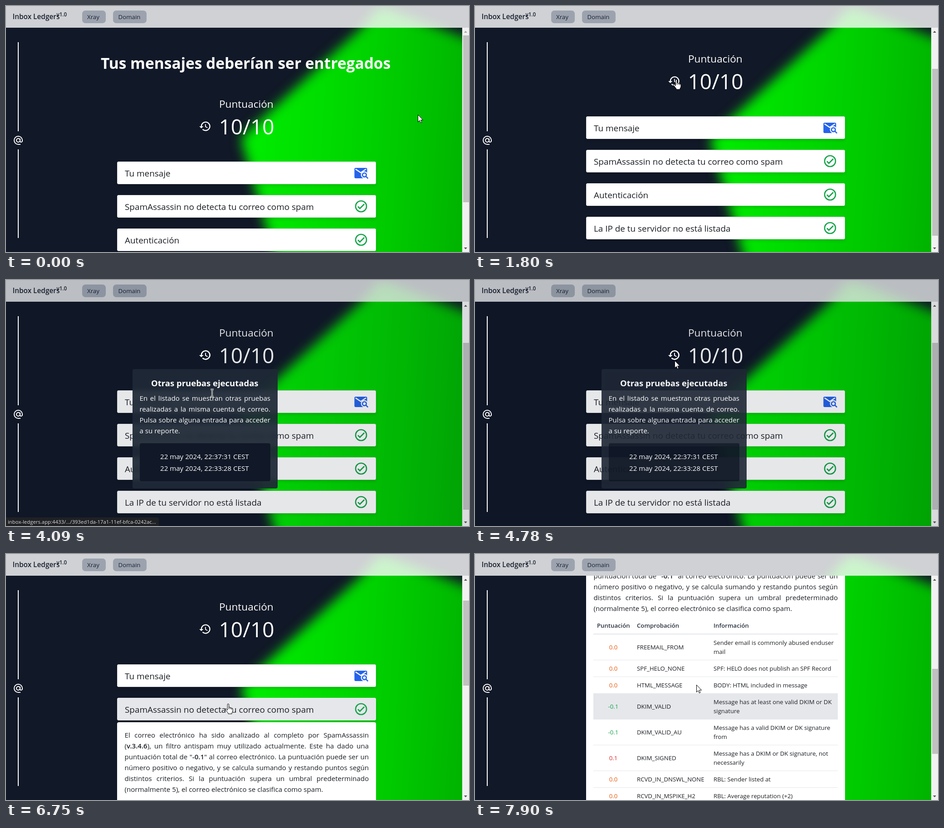
These frames come from a looping animation (1021 px wide and 544 px high, 8000 ms). An HTML page:

```html
<!DOCTYPE html>
<html lang="es">
<head>
<meta charset="utf-8">
<title>Inbox Ledgers</title>
<style>
  html, body { margin: 0; width: 100%; height: 100%; overflow: hidden; background: #111827; }
  body { position: relative; font-family: "Open Sans", "Noto Sans", sans-serif; color: #fff; }
  div, svg { position: absolute; }
  svg { overflow: visible; fill: none; }
  .fill { inset: 0; }
  .t { line-height: 0; white-space: pre; }
  .justify { white-space: nowrap; text-align: justify; text-align-last: justify; }
  b { font-weight: 600; }
  #glow { filter: blur(13px); }
  #glow div { width: 1080px; height: 620px;
    background: linear-gradient(93.5deg, #00ee00 48%, #00d800 68%, #00c800 80%, #00ae00 96%);
    clip-path: polygon(520px 290px, 784px 48px, 820px 6px, 836px 4px, 1070px 91px, 1070px 620px, 611px 620px, 521px 304px); }
  #header { width: 1021px; height: 48px; background: rgba(255,255,255,.8); color: #1a2130; }
  .button { top: 10px; height: 28px; border-radius: 7px; background: #9ca3af; }
  #view { top: 48px; width: 1006px; height: 496px; overflow: hidden; }
  .card { --bg: #fff; left: 245px; width: 571px; height: 50px; border-radius: 4px; background: var(--bg);
    color: #1c1f24; box-shadow: inset 0 0 0 1px #e5e7eb, 0 3px 6px rgba(0,0,0,.15); }
  .hover { --bg: #e5e7eb; }
  #panel { left: 245px; top: 472px; width: 571px; height: 640px; border-radius: 4px; background: #fff; color: #1c1f24; }
  .row { left: 16px; width: 539px; border-bottom: 1px solid #e5e7eb; box-sizing: border-box; }
  .row.hover { background: #e5e7eb; }
  .rail { left: 26px; width: 2px; background: #fff; }
  #popup { font-weight: 500; }
  #dim { background: rgba(17,24,39,.1); }
  #dialog { left: 279px; top: 197px; width: 320px; height: 264px; border-radius: 4px; background: rgba(31,41,55,.94);
    backdrop-filter: blur(4px); }
  #dates { left: 295px; top: 361px; width: 288px; height: 84px; border-radius: 4px; background: #111827; }
  .underline { text-decoration: underline; }
  #status { top: 525px; width: 337px; height: 19px; border-radius: 0 4px 0 0; background: #202124; color: #dadce0; }
  #bar { left: 1006px; top: 48px; width: 15px; height: 496px; background: #f1f1f1; }
  #thumb { left: 2px; width: 13px; background: #c1c1c1; }
</style>
</head>
<body>
<script>
const PERIOD = 8000;
const $ = id => document.getElementById(id);

// Text is placed by the left end of its baseline.
const text = (x, baseline, size, content, style = '', attrs = '') =>
  `<div class="t" ${attrs} style="left:${x}px;top:${baseline - .388 * size}px;font-size:${size}px;${style}">${content}</div>`;

const paragraph = (x, baseline, width, lines) => lines.map((line, i) =>
  `<div class="t ${i < lines.length - 1 ? 'justify' : ''}" style="left:${x}px;top:${baseline + 24 * i - 5.9}px;width:${width}px;font-size:15.1px">${line}</div>`).join('');

const icon = (x, y, size, shapes) =>
  `<svg style="left:${x}px;top:${y}px" width="${size}" height="${size}" viewBox="0 0 24 24">${shapes}</svg>`;

const box = (cls, x, y, w, h, content = '', style = '') =>
  `<div class="${cls}" style="left:${x}px;top:${y}px;width:${w}px;height:${h}px;${style}">${content}</div>`;

const HISTORY = '<path fill="#fff" d="M13 3a9 9 0 0 0-9 9H1l3.9 3.9L9 12H6a7 7 0 1 1 2.05 4.95l-1.4 1.4A9 9 0 1 0 13 3zM12 8v5l4.3 2.5.7-1.2-3.5-2.1V8z"/>';
const AT = '<g stroke="#fff" stroke-width="2"><circle cx="12" cy="12" r="4"/><path d="M17 21h-5a9 9 0 1 1 9-9v1.4a2.5 2.5 0 0 1-5 0V8"/></g>';
const CHECK = '<g stroke="#16a34a" stroke-width="2"><circle cx="12" cy="12" r="9"/><path d="M6.7 12.3 10 15.6 17.3 8.3"/></g>';
const MAIL = `<g transform="translate(0 .7)">
  <rect x="1" y="3" width="21" height="17.3" rx="2" fill="#2563eb"/>
  <path d="M2.8 5.2l8.7 5.8 8.7-5.8" stroke="var(--bg)" stroke-width="1.8"/>
  <path d="M17.5 14.7l7 7" stroke="var(--bg)" stroke-width="6"/>
  <circle cx="17.5" cy="14.7" r="5.8" fill="var(--bg)"/>
  <circle cx="17.5" cy="14.7" r="3.2" stroke="#2563eb" stroke-width="2"/>
  <path d="M19.8 17l3.6 3.6" stroke="#2563eb" stroke-width="2"/></g>`;

const card = (i, label, shapes) =>
  `<div class="card" id="card${i}" style="top:${344 + 74 * i}px">${text(17, 33, 18.9, label)}${icon(522, 9, 32, shapes)}</div>`;

const report = [
  'El correo electrónico ha sido analizado al completo por SpamAssassin',
  '(<b>v.3.4.6</b>), un filtro antispam muy utilizado actualmente. Este ha dado una',
  'puntuación total de "<b>-0.1</b>" al correo electrónico. La puntuación puede ser un',
  'número positivo o negativo, y se calcula sumando y restando puntos según',
  'distintos criterios. Si la puntuación supera un umbral predeterminado',
  '(normalmente 5), el correo electrónico se clasifica como spam.'];

const checks = [
  ['0.0', 'FREEMAIL_FROM', 'Sender email is commonly abused enduser', 'mail'],
  ['0.0', 'SPF_HELO_NONE', 'SPF: HELO does not publish an SPF Record'],
  ['0.0', 'HTML_MESSAGE', 'BODY: HTML included in message'],
  ['-0.1', 'DKIM_VALID', 'Message has at least one valid DKIM or DK', 'signature'],
  ['-0.1', 'DKIM_VALID_AU', 'Message has a valid DKIM or DK signature', 'from'],
  ['0.1', 'DKIM_SIGNED', 'Message has a DKIM or DK signature, not', 'necessarily'],
  ['0.0', 'RCVD_IN_DNSWL_NONE', 'RBL: Sender listed at'],
  ['0.0', 'RCVD_IN_MSPIKE_H2', 'RBL: Average reputation (+2)']];
const scoreColor = { '0.0': '#ea580c', '-0.1': '#16a34a', '0.1': '#dc2626' };

function table() {
  const head = (x, s) => text(x, 191, 13.2, s, 'font-weight:600;color:#272f3d');
  let html = head(24, 'Puntuación') + head(112, 'Comprobación') + head(281, 'Información')
    + box('', 16, 204, 539, 2, '', 'background:#e5e7eb');
  let top = 206;
  checks.forEach(([score, name, ...info], i) => {
    const height = 17 + 20 * info.length, mid = height / 2 + 4.5;
    html += `<div class="row" id="row${i}" style="top:${top}px;height:${height}px">`
      + text(0, mid, 13.2, score, `width:88px;text-align:center;color:${scoreColor[score]}`)
      + text(96, mid, 13.2, name)
      + info.map((s, k) => text(265, mid + 20 * k - 10 * (info.length - 1), 13.2, s)).join('') + '</div>';
    top += height;
  });
  return html;
}

const BEAM = 'd="M-3-8H-.5L.5-7.5l1-.5H4M.5-7.5v15M-3 8H-.5L.5 7.5l1 .5H4"';
const cursorShapes = {
  arrow: '<path fill="#fff" stroke="#000" d="M.5.5v16l3.6-3.4 2.4 5.4 2.5-1.1-2.4-5.3h5z"/>',
  hand: `<path fill="#fff" stroke="#000" stroke-linejoin="round" d="M-1.7 14.5V2q0-1.6 1.6-1.6T1.5 2v6q3-1 3.2 1 2.5-.8 2.8 1 2.5-.4 2.5 2v4q0 2.5-2 4v2.5H0V21l-6.2-8q-1-2 .8-2.2 1.3 0 3.7 3.7z"/>
    <path stroke="#000" d="M1.5 8v4m3.2-3v3m2.8-2v3"/>`,
  beam: `<path stroke="#fff" stroke-width="3" ${BEAM}/><path stroke="#000" ${BEAM}/>`
};

document.body.innerHTML = `
  <div id="glow" class="fill"><div></div></div>
  <div id="view"><div id="content">
    ${text(209, 139, 33.5, 'Tus mensajes deberían ser entregados', 'font-weight:700')}
    ${text(470, 226, 22.6, 'Puntuación')}
    ${text(469.5, 284, 46, '10/10')}
    ${icon(425, 252, 28, HISTORY)}
    ${card(0, 'Tu mensaje', MAIL)}
    ${card(1, 'SpamAssassin no detecta tu correo como spam', CHECK)}
    ${card(2, 'Autenticación', CHECK)}
    ${card(3, 'La IP de tu servidor no está listada', CHECK)}
    <div id="panel">${paragraph(16.5, 34, 538.5, report)}${table()}</div>
  </div></div>
  <div id="header">
    ${text(14.5, 30, 15.4, 'Inbox Ledgers', 'font-weight:600')}
    ${text(111.5, 24, 11.6, 'v1.0', 'font-weight:600')}
    ${box('button', 168, 10, 52, 28, text(11, 19, 13.3, 'Xray', 'font-weight:500'))}
    ${box('button', 236, 10, 74, 28, text(11.5, 19, 13.3, 'Domain', 'font-weight:500'))}
  </div>
  <div id="bar"><div id="thumb"></div>
    <svg width="15" height="496"><path id="up" d="M4 11l3.5-4 3.5 4z"/><path fill="#505050" d="M4 486l3.5 4 3.5-4z"/></svg>
  </div>
  <div id="popup" class="fill">
    <div id="dim" class="fill"></div>
    ${icon(425, 152, 28, HISTORY)}
    <div id="dialog"></div><div id="dates"></div>
    ${text(320, 235, 18.5, 'Otras pruebas ejecutadas', 'font-weight:700')}
    ${paragraph(294.5, 267, 288.5, [
      'En el listado se muestran otras pruebas',
      'realizadas a la misma cuenta de correo.',
      'Pulsa sobre alguna entrada para acceder',
      'a su reporte.'])}
    ${text(340, 396, 15.1, '22 may 2024, 22:37:31 CEST', '', 'id="link"')}
    ${text(340, 422, 15.1, '22 may 2024, 22:33:28 CEST')}
  </div>
  ${box('rail', 26, 80, 2, 197)}${icon(15, 285, 24, AT)}${box('rail', 26, 317, 2, 196)}
  <div id="status">${text(4, 14, 11.35, 'inbox-ledgers.app:4433/.../393ed1da-17a1-11ef-bfca-0242ac...')}</div>
  <svg id="cursor" width="1" height="1">${Object.entries(cursorShapes).map(([k, s]) => `<g id="${k}">${s}</g>`).join('')}</svg>`;

const ramp = (t, a, b) => {
  const u = Math.min(1, Math.max(0, (t - a) / (b - a)));
  return u * u * (3 - 2 * u);
};

const path = [
  [1110, 908, 240], [1800, 444, 162], [2510, 444, 162], [2910, 448, 205], [3190, 448, 205],
  [3550, 440, 390], [3800, 440, 390], [4090, 454, 250], [4330, 454, 250], [4700, 440, 178],
  [5050, 440, 178], [5490, 470, 245], [5790, 478, 262], [6210, 478, 262], [6600, 490, 331],
  [7180, 490, 331], [7700, 488, 289]];

function cursorAt(t) {
  let [, x, y] = path[0];
  for (let i = 1; i < path.length; i++) {
    const u = ramp(t, path[i - 1][0], path[i][0]);
    x += (path[i][1] - path[i - 1][1]) * u;
    y += (path[i][2] - path[i - 1][2]) * u;
  }
  return [x, y];
}

const kinds = [[0, 'arrow'], [1700, 'hand'], [2800, 'arrow'], [3260, 'beam'], [3450, 'hand'], [3900, 'beam'],
  [4500, 'arrow'], [5340, 'hand'], [7300, 'arrow']];
const between = (t, a, b) => t >= a && t < b;
const show = (id, on) => { $(id).style.visibility = on ? 'visible' : 'hidden'; };

function draw(t) {
  const open = t >= 6600;
  const scroll = 100 * ramp(t, 1110, 1450) + 400 * ramp(t, 7180, 7820);
  const total = open ? 1219 : 621;
  $('content').style.transform = `translateY(${-48 - scroll}px)`;
  $('thumb').style.top = 17 + 462 * scroll / total + 'px';
  $('thumb').style.height = 462 * 496 / total + 'px';
  $('up').style.fill = scroll ? '#505050' : '#a3a3a3';

  $('popup').style.opacity = ramp(t, 2110, 2380) - ramp(t, 4750, 5050);
  $('link').classList.toggle('underline', between(t, 3450, 3900));
  show('status', between(t, 3500, 4210));

  $('card0').classList.toggle('hover', between(t, 5560, 6340));
  $('card1').classList.toggle('hover', between(t, 6460, 7350));
  $('row3').classList.toggle('hover', t >= 7700);
  show('panel', open);
  show('card2', !open);
  show('card3', !open);

  const [x, y] = cursorAt(t).map(Math.round);
  const kind = kinds.filter(k => t >= k[0]).pop()[1];
  $('cursor').style.transform = `translate(${x}px,${y}px)`;
  for (const k in cursorShapes) show(k, k === kind);
}

const start = performance.now();
function tick() {
  draw((performance.now() - start) % PERIOD);
  requestAnimationFrame(tick);
}
tick();
</script>
</body>
</html>
```
